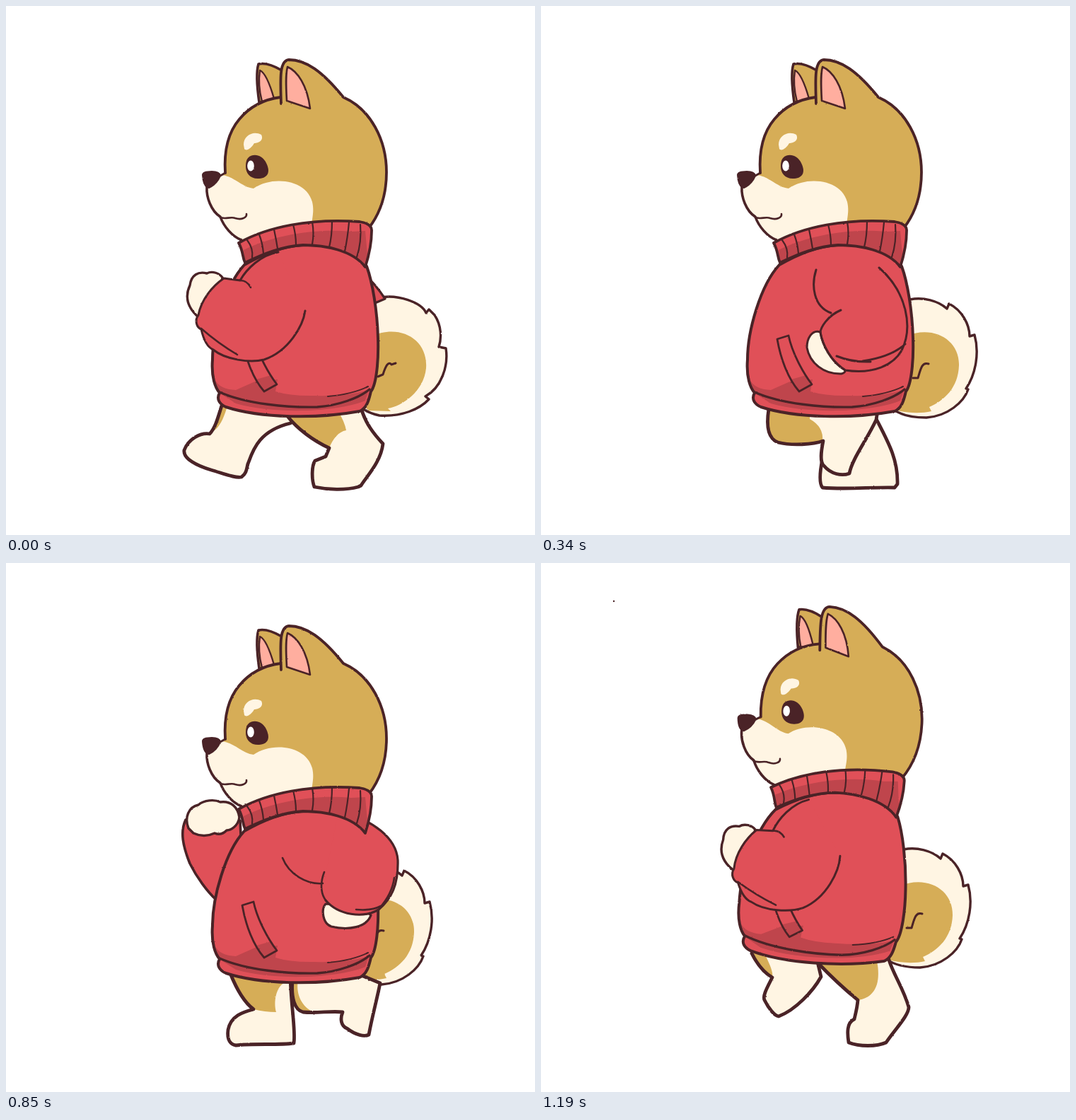
Write an HTML page that moves like this. It is 748 by 748 pixels and loops after 1360 ms.

```html
<!DOCTYPE html>
<html lang="en">
<head>
<meta charset="utf-8">
<title>Walking dog</title>
<style>
html, body { margin: 0; width: 100%; height: 100%; overflow: hidden; background: #fff; }
svg { display: block; width: 100vw; height: 100vh; }
path { stroke-linecap: round; stroke-linejoin: round; }
.pose { visibility: hidden; animation: pose 1360ms step-end infinite; }
@keyframes pose {
  0% { visibility: visible; }
  12.5%, 100% { visibility: hidden; }
}
</style>
</head>
<body>
<svg id="stage" viewBox="0 0 748 748"></svg>
<script>
const INK = '#4a2327', TAN = '#d6ad57', CREAM = '#fff5e3';
const RED = '#e05058', SHADE = '#bf454c', PINK = '#ffae9f';

const shape = (d, fill = 'none', w = 0) =>
  `<path d="${d}" fill="${fill}"${w ? ` stroke="${INK}" stroke-width="${w}"` : ''}/>`;
const line = (d, w = 2.6) => shape(d, 'none', w);
const move = (x, y, s) => `<g transform="translate(${x} ${y})">${s}</g>`;
const turn = (deg, x, y, s) => `<g transform="rotate(${deg} ${x} ${y})">${s}</g>`;

// Cream leg with a tan patch under its outline
const leg = (d, patch) => shape(d, CREAM) + shape(patch, TAN) + line(d, 4.8);

const head =
  shape('M358 136C355 115 353 95 357 82C366 80 378 84 390 91L389 136Z', TAN, 3.6) +
  shape('M359 91C366 94 373 110 379 131L362 135C358 120 357 104 359 91Z', PINK, 2.4) +
  shape('M310 236C308 205 313 180 330 160C345 142 365 132 389 129C387 104 389 77 400 76C424 76 447 92 477 129C516 146 538 190 538 235C538 265 530 292 513 314L440 345L333 331C320 326 308 312 303 298C290 290 283 270 284 256Z', TAN) +
  shape('M304 239C322 240 333 256 350 258C375 240 424 244 433 277C436 290 433 298 432 312L400 340L333 331C320 326 308 312 303 298C290 290 283 270 284 256Z', CREAM) +
  line('M310 236C308 205 313 180 330 160C345 142 365 132 388 129', 3.8) +
  line('M389 138C388 105 386 77 400 76C424 76 447 92 477 129C516 146 538 190 538 235C538 265 530 292 513 314', 3.8) +
  line('M284 256C283 270 290 290 303 298C308 312 320 326 333 331', 3.6) +
  shape('M398 86C412 92 426 112 430 145L397 134C396 115 395 98 398 86Z', PINK, 2.6) +
  shape('M278 239Q278 234 291 234Q302 234 303 240Q298 252 287 257Q279 256 278 239Z', INK, 2) +
  line('M303 240L310 236', 3) +
  line('M302 298C308 303 318 297 324 300C333 303 341 299 340 294') +
  shape('M336 196C336 183 350 176 361 182C365 190 357 194 351 194C347 201 340 206 337 202Z', CREAM) +
  shape('M343 214C350 208 362 210 368 222C374 234 371 243 358 244C345 245 339 236 339 227C339 221 340 217 343 214Z', INK) +
  '<ellipse cx="346" cy="226" rx="4.8" ry="7.5" fill="#fff"/>';

const coat = 'M337 366C310 395 292 460 292 500C290 525 296 540 302 547C297 556 302 563 311 567C360 583 440 584 500 573C512 568 514 552 516 545C524 535 527 500 526 470C525 430 518 390 510 368C490 342 450 337 420 338C390 340 365 350 337 366Z';
const body =
  shape(coat, RED) +
  shape('M295 528Q302 542 325 543L352 531L384 528L381 545Q400 551 430 551C470 552 500 548 514 542C500 553 470 564 440 566C400 567 340 562 302 546Z', SHADE) +
  shape('M303 548C340 563 400 568 440 567C470 565 500 554 512 546L508 558C470 574 380 578 325 562Z', SHADE) +
  line(coat, 4) +
  line('M302 546C340 563 400 568 440 567C470 565 500 554 514 542', 3.4) +
  line('M455 552Q490 549 512 538', 2) +
  shape('M334 471L350 466C355 490 370 518 383 535L365 545C350 528 339 500 334 471Z', RED) +
  shape('M354 528L375 522L383 535L365 545Z', SHADE) +
  line('M334 471L350 466C355 490 370 518 383 535L365 545C350 528 339 500 334 471Z', 2.8);

const rim = 'M329 335C370 312 430 300 500 305Q518 308 517 318C517 335 514 350 508 369C490 345 450 338 420 338C390 340 365 350 338 363C334 355 336 348 329 335Z';
const collar =
  shape(rim, RED) +
  shape('M336 345C380 323 440 314 488 319L508 318L511 352L508 369C490 345 450 338 420 338C390 340 365 350 338 363Z', SHADE) +
  line('M341 331Q350 343 348 356M358 323Q363 336 364 350M379 316Q382 330 384 343M406 309Q410 324 410 337M433 305Q436 322 433 337M461 304Q461 325 457 341M485 306Q483 328 479 347M501 309Q503 334 496 355', 2.2) +
  line(rim, 3.8);

const makeTail = (fur, patch, curl) =>
  shape(fur, CREAM) + shape(patch, TAN) + line(fur, 3.4) + line(curl, 3);
const tail = makeTail(
  'M522 415C540 411 562 417 574 428L577 421C595 430 606 450 606 467L613 465C620 490 615 520 601 541L604 542C598 560 575 580 545 582C525 582 508 578 497 570',
  'M515 467C555 450 592 472 591 508C590 540 570 558 549 567L552 573C535 577 515 575 500 571L505 520Z',
  'M526 526L533 526C537 512 539 503 548 506');
const tailOut = makeTail(
  'M524 413C555 406 588 420 594 434L598 429L606 437C616 452 616 470 612 482L622 484C626 510 615 540 593 552L598 556C585 570 560 581 528 579C515 576 508 573 503 568',
  'M515 468C555 448 597 470 594 512C591 545 560 566 540 569L544 573L512 572L503 560Z',
  'M526 524L533 521C537 508 541 502 545 507L551 505');

// Leg outlines shared by both sides
const reach = 'M306 562C300 580 297 595 288 605C275 603 258 612 252 628C250 640 270 650 290 656C310 662 325 668 333 666C342 660 340 650 343 645C350 625 360 600 402 590L440 570';
const push = 'M398 580C412 598 435 615 457 625L452 637L437 643C432 650 432 670 436 680C455 684 480 685 498 680L502 678C510 665 530 645 533 619C520 605 508 590 502 568';
const plant = 'M317 580C325 600 335 620 350 631C335 635 318 640 314 660C312 675 318 681 325 682C350 679 385 682 407 679C410 660 402 620 402 580';
const lift = 'M405 590C403 615 408 632 420 635C440 637 460 633 476 635C472 645 474 655 482 658C495 668 507 670 513 667C518 640 525 615 529 594L500 582';

const legs = [
  leg(reach, 'M306 562L314 562C309 580 304 592 296 599L289 604C297 595 300 580 306 562Z') +
    leg(push, 'M398 580C412 598 435 615 457 625C462 612 470 602 481 600Q479 588 468 570Z'),
  leg(plant, 'M317 580C325 600 335 620 350 631C342 615 334 600 333 580Z') +
    leg(lift, 'M405 590C403 615 408 632 420 635Q440 637 452 634C448 618 456 602 470 585Z'),
  leg('M430 575L398 640C394 660 393 675 398 681C430 684 470 680 500 681L504 676C505 640 490 615 472 580', 'M0 0') +
    leg('M322 570C318 595 322 612 335 617C355 622 385 620 399 615C396 630 394 645 400 650C410 662 425 665 436 661C440 640 460 615 474 585L476 572',
      'M322 570C318 595 322 612 335 617C355 622 385 620 398 615Q400 595 380 584L380 570Z'),
  leg('M416 560C430 585 445 600 450 613Q455 620 452 628L440 630C432 645 431 660 433 670L470 675L483 672C495 655 520 640 527 618C522 600 508 575 502 552',
    'M416 560L447 597C446 580 442 572 438 560Z') +
    leg('M312 550C312 575 325 592 344 596C338 608 330 620 333 632C340 642 352 646 362 642C380 630 395 595 418 570L418 555',
      'M312 550C312 575 325 592 344 596C347 588 353 577 362 572L340 555Z'),
  leg(push, 'M398 580C412 598 430 612 447 620Q440 594 422 575Z') +
    leg(reach, 'M306 562C300 580 297 595 288 605L322 608C328 592 345 588 366 570Z'),
  leg(lift, 'M405 590C403 615 408 632 420 635L433 634C415 625 410 605 413 590Z') +
    leg(plant, 'M317 580C325 600 335 620 350 631Q366 635 382 635C378 620 382 600 393 594L380 580Z'),
  leg('M322 570C318 595 320 612 330 620C345 625 360 618 370 613C362 625 368 640 378 650L400 635L412 631L390 578',
    'M322 570C320 595 320 610 326 613C330 595 335 583 337 570Z') + line('M369 614L385 606', 3.4) +
    leg('M388 578C395 605 403 622 412 631C395 633 378 640 376 660C371 675 374 682 380 684C410 682 450 680 482 681L485 676C478 650 475 620 476 572',
      'M388 578C395 605 403 622 412 629L446 626C447 605 452 590 459 574Z'),
  leg('M298 552C308 572 320 582 327 586C320 600 313 612 316 618C322 630 330 640 336 641C360 632 385 605 396 585L390 560',
    'M298 552C308 572 320 582 327 586C329 578 322 565 316 552Z') +
    leg('M390 564C415 590 432 605 448 618C447 630 444 640 443 645C432 650 433 665 435 678C450 684 475 684 488 678C500 660 520 640 520 628C512 600 497 580 491 558',
      'M390 564C415 590 432 605 448 618C470 615 483 597 474 558Z')
];

// Near arm: hand, sleeve and creases
const armFront =
  shape('M272 440C255 425 253 410 260 395C262 380 272 375 284 378C292 374 302 378 306 384L300 420Z', CREAM, 3.4) +
  shape('M385 348C360 352 340 372 331 388L308 385C292 396 276 415 272 437C266 445 270 455 276 457C280 475 286 483 293 486C310 500 345 505 365 500C400 488 420 452 423 431', RED, 3) +
  line('M331 388Q341 388 346 398M276 456Q300 477 327 493');
const armBack =
  shape('M452 482C445 490 448 510 460 514C485 520 510 515 516 498L500 485Z', CREAM, 3.2) +
  shape('M470 352C520 362 552 390 554 420C555 455 545 475 527 490C505 503 470 498 452 477L450 450', RED) +
  line('M470 352C520 362 552 390 554 420C555 455 545 475 527 490C505 503 470 498 452 477', 3.2) +
  line('M391 417C400 440 425 455 448 453M450 437C443 455 446 470 453 478M495 490Q517 492 530 485M528 488Q546 468 549 445');
const armPass =
  shape('M395 461C383 457 376 470 376 483C380 505 400 521 425 520Q432 518 429 514C410 502 398 480 395 461Z', CREAM, 3) +
  line('M389 373C382 395 385 425 410 434M424 430C405 438 395 455 395 462C398 480 412 505 430 515C470 521 498 508 510 487C526 455 518 405 478 370M418 495Q440 504 466 503M455 502Q495 496 515 478', 3);
const armSwing =
  shape('M410 454C402 460 402 475 404 485C415 500 440 502 462 494L430 465Z', CREAM, 3) +
  shape('M460 335C500 352 530 390 529 420C530 445 515 465 500 475C480 491 445 492 418 462L414 435', RED) +
  line('M460 335C500 352 530 390 529 420C528 440 524 450 519 460Q510 477 487 487C460 493 435 485 414 459', 3) +
  line('M377 372C376 395 395 415 414 420M425 413C411 424 410 445 418 456M430 470Q450 478 472 477M470 476Q505 467 521 445');
const armRise =
  shape('M343 424C330 424 325 430 318 436C312 450 320 475 325 485Q333 494 345 491L352 450Z', CREAM, 3.2) +
  shape('M383 412C365 414 350 420 343 424C336 440 338 465 348 490C365 510 395 520 420 514C450 505 468 470 470 440C472 420 470 405 466 393', RED, 3) +
  line('M389 349C372 365 364 390 370 412M370 494Q400 503 435 502');

// Far arm, behind the coat
const paw =
  shape('M254 363C246 380 250 400 260 425C270 445 285 465 297 476L332 385L331 364Z', RED, 3.6) +
  shape('M258 375C252 360 258 345 272 342C280 335 295 334 303 338C318 336 328 345 330 360C328 372 318 378 312 378Q304 386 295 382Q280 389 265 382Z', CREAM, 3.4);
const pawLow =
  shape('M284 442Q285 459 298 464L310 440Z', RED, 3.4) +
  shape('M320 378Q308 375 300 384C284 390 275 408 275 425C275 440 285 447 302 447', CREAM, 3.4);
const elbow = shape('M505 378Q520 390 536 414L510 425Z', RED, 3.2);

const dot = (x, y) => `<circle cx="${x}" cy="${y}" r="1.2" fill="${INK}"/>`;

const poses = [
  { dy: 0, tail: tailOut, far: elbow, arm: armFront },
  { dy: 13, tail: move(0, 13, tailOut), far: move(0, 13, elbow), arm: move(-8, 7, armFront) },
  { dy: 0, tail, arm: armPass },
  { dy: -15, tail: move(-6, -16, tail), far: pawLow, arm: armSwing },
  { dy: 0, tail: move(-10, 0, tail), far: move(4, 6, paw), arm: move(-5, -13, armBack) },
  { dy: 13, tail: move(-14, 14, tail), far: paw, arm: armBack },
  { dy: 0, tail: move(-9, 0, tail), arm: armRise, specks: dot(637, 625) + dot(649, 643) },
  { dy: -15, tilt: 2.7, tail: move(-9, -10, tail), arm: move(-2, -4, turn(-4.5, 263, 400, armFront)), specks: dot(103, 54) }
];

const draw = ({ dy, tilt = 0, tail, far = '', arm, specks = '' }, i) => {
  const lean = s => turn(tilt, 385, 235, move(0, dy, s));
  return `<g class="pose" style="animation-delay:${(i - poses.length) * 170}ms"><g filter="url(#rough)">` +
    tail + far + legs[i] + lean(head + body) + arm + lean(collar) + `</g>${specks}</g>`;
};

document.getElementById('stage').innerHTML =
  `<filter id="rough" filterUnits="userSpaceOnUse" x="0" y="0" width="748" height="748" color-interpolation-filters="sRGB">
    <feTurbulence type="fractalNoise" baseFrequency=".4" numOctaves="1" seed="4"/>
    <feDisplacementMap in="SourceGraphic" scale="2" xChannelSelector="R" yChannelSelector="G"/>
  </filter>` + poses.map(draw).join('');
</script>
</body>
</html>
```
